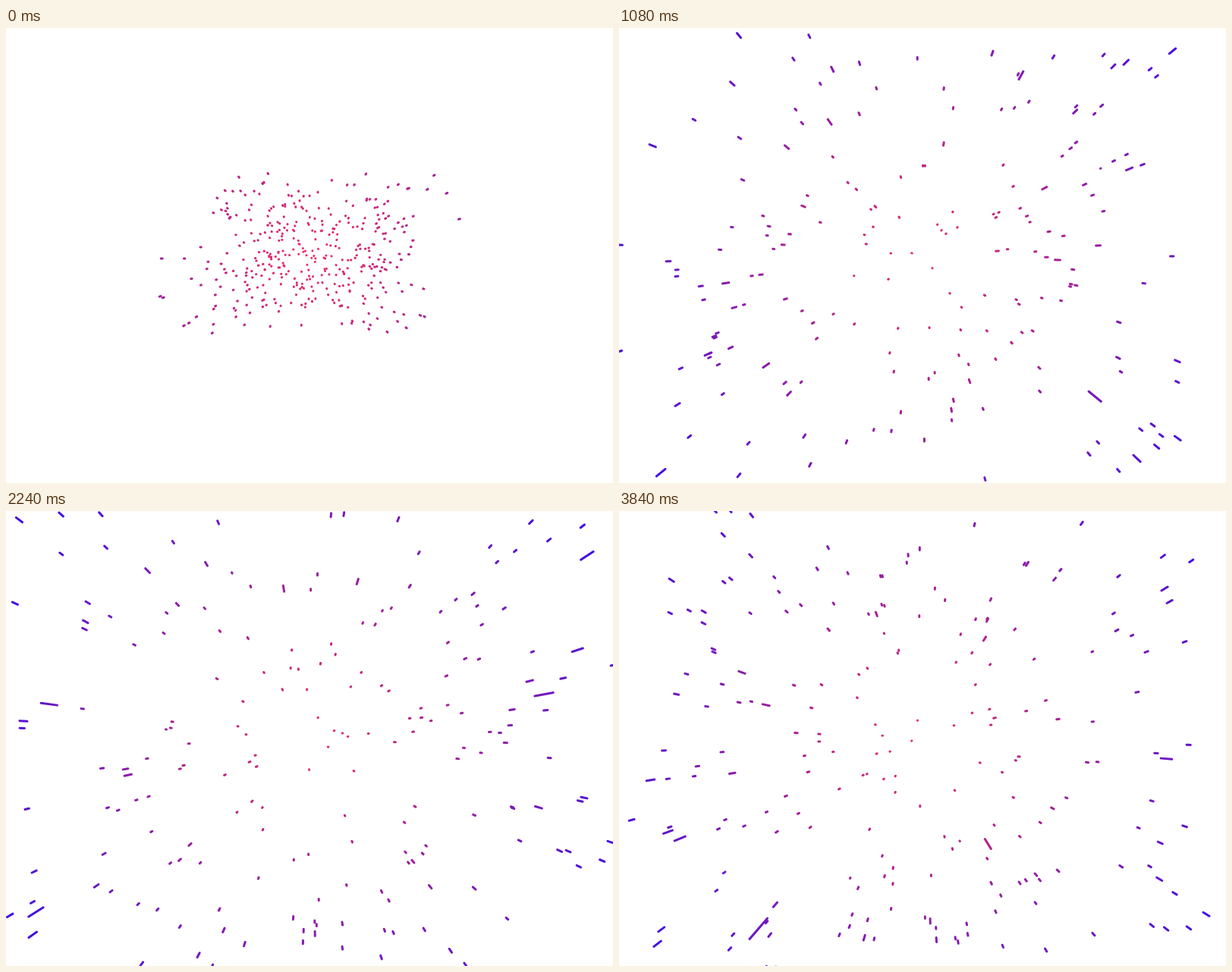
An HTML page with a canvas that plays this animation: 800x600 px, repeating every 3.88 s.

```html
<!DOCTYPE html>
<html lang="en">
<head>
<meta charset="utf-8">
<title>Starfield</title>
<style>
  html, body { margin: 0; width: 100%; height: 100%; overflow: hidden; background: #fff; }
  canvas { display: block; }
</style>
</head>
<body>
<canvas id="stage" width="800" height="600"></canvas>
<script>
const ctx = document.getElementById('stage').getContext('2d');
const LOOP = 3880, STEP = 40;
const SPEED = 0.0021;   // depth travelled per ms
const TRAIL = 5;        // streak duration in ms
const NEAR = 0.06;      // stars closer than this are gone

let seed = 20417;
function random() {
  seed = (seed + 0x6D2B79F5) | 0;
  let n = Math.imul(seed ^ (seed >>> 15), 1 | seed);
  n = (n + Math.imul(n ^ (n >>> 7), 61 | n)) ^ n;
  return ((n ^ (n >>> 14)) >>> 0) / 4294967296;
}
const between = (a, b) => a + (b - a) * random();

function makeStar(halfWidth, halfHeight, depth, birth) {
  return { x: between(-halfWidth, halfWidth), y: between(-halfHeight, halfHeight), depth, birth };
}

// An opening burst, then a steady stream of new stars
const stars = [];
for (let i = 0; i < 390; i++) stars.push(makeStar(205, 130, between(1, 2.25), -TRAIL));
for (let i = 0; i < 2400; i++) stars.push(makeStar(286, 248, 1.1, between(400, LOOP)));

const glow = ctx.createRadialGradient(400, 300, 0, 400, 300, 440);
glow.addColorStop(0, 'rgb(240,45,95)');
glow.addColorStop(1, 'rgb(66,15,228)');
ctx.strokeStyle = glow;
ctx.lineWidth = 3;
ctx.lineCap = 'round';

function draw(time) {
  ctx.fillStyle = '#fff';
  ctx.fillRect(0, 0, 800, 600);
  ctx.beginPath();
  for (const { x, y, depth, birth } of stars) {
    const age = time - birth;
    const z = depth - age * SPEED;
    if (age < 0 || z < NEAR) continue;
    const tail = z + Math.min(age, TRAIL) * SPEED;
    ctx.moveTo(400 + x / tail, 300 + y / tail);
    ctx.lineTo(400 + x / z, 300 + y / z);
  }
  ctx.stroke();
}

const start = performance.now();
function tick() {
  const time = (performance.now() - start) % LOOP;
  draw(Math.floor(time / STEP) * STEP);
  requestAnimationFrame(tick);
}
tick();
</script>
</body>
</html>
```
